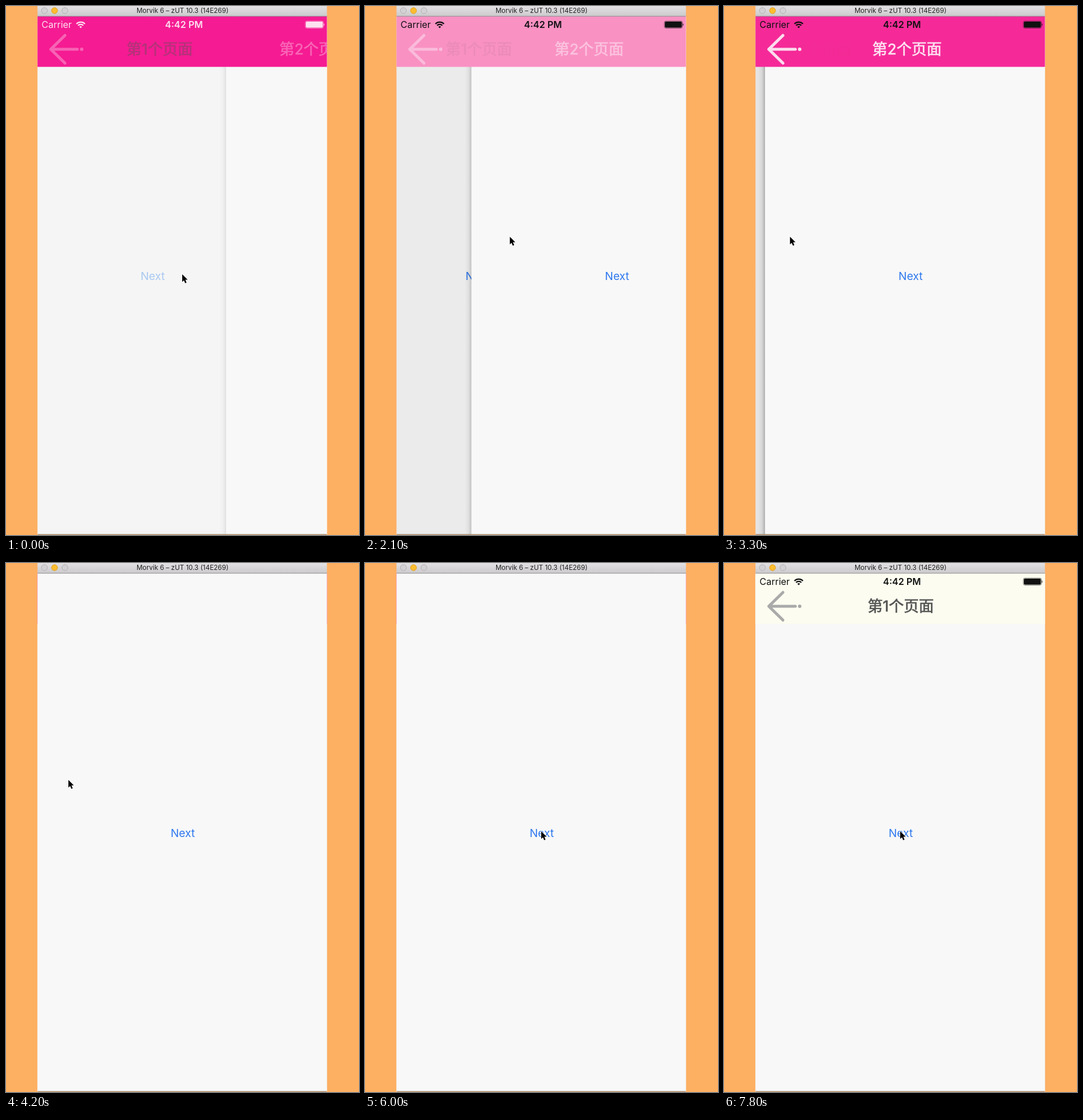
An HTML page that plays this animation: 611x917 px, repeating every 8000 ms.

```html
<!DOCTYPE html>
<html lang="zh">
<head>
<meta charset="utf-8">
<style>
html, body { margin: 0; width: 100%; height: 100%; overflow: hidden; background: #fdaf62 }
svg { display: block }
text { font-family: Inter, "Noto Sans CJK SC", "Noto Sans CJK", sans-serif }
.mid { text-anchor: middle }
.next { font-size: 19px; fill: #2e78ee }
.title { font-size: 26px; stroke-width: .7 }
.status { font-size: 16px }
</style>
</head>
<body>
<svg width="611" height="917" viewBox="0 0 611 917">
  <defs>
    <clipPath id="screen"><rect x="54.5" y="18" width="501" height="898"/></clipPath>
    <linearGradient id="chrome" x2="0" y2="1">
      <stop stop-color="#e3e1e3"/><stop offset="1" stop-color="#cbc9cb"/>
    </linearGradient>
    <linearGradient id="shade">
      <stop stop-opacity="0"/><stop offset=".55" stop-opacity=".06"/><stop offset="1" stop-opacity=".24"/>
    </linearGradient>
  </defs>
  <path d="M54.5 0H555.5V18H54.5z" fill="url(#chrome)"/>
  <g stroke="#b3b1b3" fill="#d3d1d3">
    <circle cx="66.5" cy="8" r="5.2"/>
    <circle cx="84" cy="8" r="5.2" fill="#fdbd2f" stroke="#e0a02a"/>
    <circle cx="102" cy="8" r="5.2"/>
  </g>
  <text class="mid" x="305.5" y="12.3" font-size="11.5" fill="#222">Morvik 6 – zUT 10.3 (14E269)</text>

  <g clip-path="url(#screen)">
    <g id="under">
      <rect x="54" y="18" width="802" height="899" fill="#f8f8f8"/>
      <text id="back" class="next mid" x="306" y="475">Next</text>
    </g>
    <rect id="dim" x="54" y="18" width="502" height="899"/>
    <g id="top">
      <rect id="edge" x="42" y="18" width="12" height="899" fill="url(#shade)"/>
      <rect x="54" y="18" width="502" height="899" fill="#f8f8f8"/>
      <text class="next mid" x="306" y="475">Next</text>
    </g>
    <g id="bar">
      <rect id="fill" x="54" y="18" width="502" height="87.5"/>
      <g id="items">
        <text id="title1" class="title mid" y="83.5" fill="#555" stroke="#555">第1个页面</text>
        <text id="title2" class="title mid" y="83.5" fill="#fff" stroke="#fff">第2个页面</text>
        <g id="arrow">
          <path d="M102 51L77.5 75L102 99M78 75H123.5" fill="none" stroke="currentColor"
            stroke-width="5" stroke-linecap="round" stroke-linejoin="round"/>
          <circle cx="131" cy="75" r="3" fill="currentColor"/>
        </g>
      </g>
      <g id="status" class="status" fill="currentColor">
        <text x="61.5" y="38">Carrier</text>
        <text class="mid" x="308" y="38" font-weight="600">4:42 PM</text>
        <path d="M121.9 31A10.4 10.4 0 0 1 136.7 31M124.7 33.8A6.4 6.4 0 0 1 133.9 33.8"
          fill="none" stroke="currentColor" stroke-width="2.3"/>
        <path d="M129.3 38.4l-2.3-2.3a3.2 3.2 0 0 1 4.6 0z"/>
        <rect x="518" y="26" width="31.5" height="12.5" rx="3" fill="none" stroke="currentColor" opacity=".5"/>
        <rect x="519" y="27" width="29.5" height="10.5" rx="2"/>
        <path d="M550.3 30q2 2.3 0 4.6z"/>
      </g>
    </g>
  </g>
  <path d="M54.5 17.8H555.5" stroke="#8f8d8f"/>
  <path d="M55 916H555" stroke="#8a7a6c"/>
  <path id="cursor" d="M0 0V13.2L3 10.4L5.1 15.4L7.5 14.4L5.4 9.5H9.5z" stroke="#fff" stroke-width="1.4" paint-order="stroke"/>
</svg>
<script>
const LOOP = 8000, STEP = 300, WIDTH = 501;
const PUSH = 327, DRAG = 133, CENTER = 306;
const pink = [245, 27, 146], cream = [252, 253, 240];

// Each round pushes a page, drags it by its edge, then clicks Next.
// Shared bar over pages 1 and 2; a bare page over the bar; page 1 carrying its bar.
const rounds = [
  { first: 0, last: 12, dragY: 400 },
  { first: 13, last: 20, dragY: 376 },
  { first: 21, last: 26, dragY: 400 }
];

const $ = id => document.getElementById(id);
const set = (id, name, value) => $(id).setAttribute(name, value);
const move = (id, x, y = 0) => set(id, "transform", `translate(${x} ${y})`);
const mix = (a, b, k) => a.map((v, i) => v + (b[i] - v) * k);

function draw(step) {
  const stage = rounds.findIndex(r => step <= r.last);
  const { first, last, dragY } = rounds[stage];
  const push = step == first, click = step == last;
  const shared = stage == 0, bare = stage == 1;

  // slow pull to the right, then back
  const u = Math.max(0, (step - first - 1) / (last - first - 1));
  const x = push ? PUSH : click ? 0 : DRAG * Math.sin(Math.PI * u ** 1.3) ** 2;
  const p = x / WIDTH;

  move("under", -150 * (1 - p));
  move("top", x);
  if (push || click) move("cursor", 305, 465);
  else move("cursor", 94 + 14 * (1 - u) ** 2 + 1.18 * x, dragY);
  set("dim", "opacity", .09 * (1 - p) ** 2);
  set("edge", "opacity", x ? 1 - p : 0);
  $("back").style.fill = push ? "#a9cbf4" : "";

  if (shared) $("top").after($("bar"));
  else if (bare) $("top").before($("bar"));
  else $("top").append($("bar"));

  const pinkness = shared ? (push ? 1 : 1 - 2 * p) : bare ? 1 : 0;
  const fade = push ? 1 - p : 1 - 2 * p;
  set("fill", "fill", `rgb(${mix(cream, pink, pinkness).map(Math.round)})`);
  set("items", "opacity", bare ? 0 : 1);
  set("title1", "x", CENTER - (shared ? (push ? 115 : 147) * (1 - p) : 0));
  set("title1", "opacity", shared ? p * (push ? .6 : .3) : 1);
  set("title2", "x", CENTER + p * (push ? 348 : 315));
  set("title2", "opacity", shared ? fade * .93 : 0);
  set("arrow", "opacity", shared ? fade : 1);
  set("arrow", "color", shared ? "#fdeaf4" : "#aaa");
  set("status", "color", pinkness == 1 ? "#fde0f0" : "#111");
}

const start = performance.now();
function tick() {
  draw(Math.floor((performance.now() - start) % LOOP / STEP));
  requestAnimationFrame(tick);
}
tick();
</script>
</body>
</html>
```
